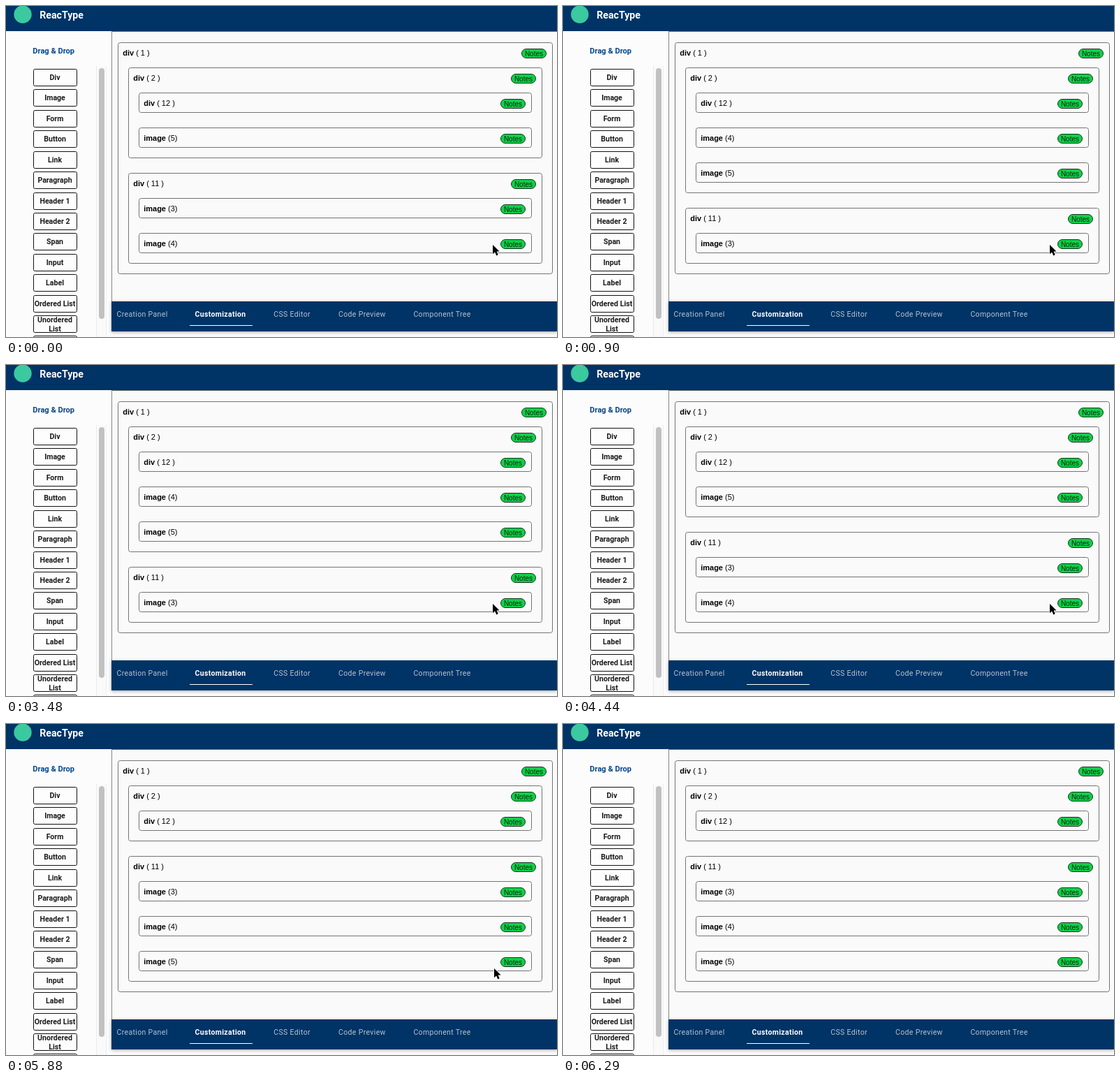
Write an HTML page that moves like this. It is 789 px wide and 474 px high and loops after 6530 ms.

```html
<!DOCTYPE html>
<html lang="en">
<head>
<meta charset="utf-8">
<title>Component nesting</title>
<style>
html, body { margin: 0; width: 100%; height: 100%; overflow: hidden; background: #fafafa; }
svg { display: block; width: 789px; height: 474px; }
text { white-space: pre; }
.ui { font-family: Roboto, sans-serif; }
.brand { font-size: 14.2px; font-weight: 700; fill: #fff; }
.head { font-size: 11.1px; font-weight: 700; fill: #08478a; text-anchor: middle; }
.item { font-size: 10.6px; font-weight: 700; fill: #1c1c1c; text-anchor: middle; }
.tab { font-size: 10.5px; letter-spacing: .35px; fill: #b5c2d1; }
.tab.on { font-weight: 700; fill: #fff; }
.tag { font: 11px "Liberation Sans", Arial, sans-serif; fill: #000; }
.tag tspan { font-weight: 700; }
.note { font: 10px "Liberation Sans", Arial, sans-serif; fill: #06270f; }
.bar { filter: drop-shadow(0 1px 2px rgba(0, 0, 0, .35)); }
</style>
</head>
<body>
<svg id="stage" viewBox="0 0 789 474"></svg>
<script>
const LOOP = 6530;
const stage = document.getElementById('stage');

function add(parent, tag, attrs, text) {
  const el = document.createElementNS('http://www.w3.org/2000/svg', tag);
  for (const key in attrs) el.setAttribute(key, attrs[key]);
  if (text) el.textContent = text;
  parent.appendChild(el);
  return el;
}

function rect(parent, x, y, width, height, fill, more) {
  return add(parent, 'rect', { x, y, width, height, fill, ...more });
}

function label(x, y, cls, text) {
  return add(stage, 'text', { x, y, class: 'ui ' + cls }, text);
}

function drawShell() {
  rect(stage, 0, 0, 789, 474, '#fafafa');
  rect(stage, 0, 36, 151, 438, '#fcfcfc');
  rect(stage, 0, 0, 789, 36, '#003366');
  rect(stage, 151, 36, 638, 1, '#6c7466');
  rect(stage, 151, 36, 1, 388, '#85877c');
  add(stage, 'circle', { cx: 24, cy: 12, r: 12.7, fill: '#3bc9a0' });
  label(48.2, 18, 'brand', 'ReacType');
  label(68.2, 68, 'head', 'Drag & Drop');

  const items = ['Div', 'Image', 'Form', 'Button', 'Link', 'Paragraph', 'Header 1',
    'Header 2', 'Span', 'Input', 'Label', 'Ordered List', 'Unordered|List', ''];
  items.forEach((name, i) => {
    const top = Math.round(90 + i * 29.42) + .5;
    rect(stage, 39.5, top, 62, 24, '#fdfdfd', { rx: 2, stroke: '#111' });
    const lines = name.split('|');
    lines.forEach((line, k) =>
      label(70, top + 15.7 + (k - (lines.length - 1) / 2) * 12.6, 'item', line));
  });

  rect(stage, 129, 86, 15, 388, '#fafafa');
  rect(stage, 129, 86, 1, 388, '#ececec');
  rect(stage, 143, 86, 1, 388, '#efefef');
  rect(stage, 133, 89, 8, 359, '#c1c1c1', { rx: 4 });
}

function drawTabs() {
  rect(stage, 151, 423, 638, 43, '#003366', { class: 'bar' });
  const tabs = [[158.5, 'Creation Panel'], [270.5, 'Customization'], [383.3, 'CSS Editor'],
    [476, 'Code Preview'], [583.4, 'Component Tree']];
  tabs.forEach(([x, name], i) => label(x, 445, i === 1 ? 'tab on' : 'tab', name));
  rect(stage, 263, 457, 90, 1, '#fff');
}

// Draws one nested box and returns its bottom edge.
function drawBox(parent, node, depth, top) {
  const [name, id, kids = []] = node;
  const left = 160.5 + depth * 15;
  const right = 782.5 - depth * 15;
  const frame = rect(parent, left, top, right - left, 28, 'none', { rx: 3, stroke: '#747474' });
  const tag = add(parent, 'text', { x: left + 6.7, y: top + 18.5, class: 'tag' });
  add(tag, 'tspan', {}, name);
  tag.append(' ' + id);
  rect(parent, right - 44, top + 9, 35, 13, '#10d048', { rx: 6.5, stroke: '#16351f' });
  add(parent, 'text', { x: right - 39.6, y: top + 19.2, class: 'note' }, 'Notes');

  let bottom = top + 28;
  kids.forEach((kid, i) => {
    bottom = drawBox(parent, kid, depth + 1, i ? bottom + 22 : top + 36);
  });
  if (kids.length) bottom += 15;
  frame.setAttribute('height', bottom - top);
  return bottom;
}

// Images numbered from `split` upward sit in the first group, the rest in the second.
function makeLayout(split) {
  const images = [3, 4, 5].map(n => ['image', `(${n})`]);
  const group = add(stage, 'g', {});
  drawBox(group, ['div', '( 1 )', [
    ['div', '( 2 )', [['div', '( 12 )'], ...images.slice(split - 3)]],
    ['div', '( 11 )', images.slice(0, split - 3)]
  ]], 0, 52.5);
  return group;
}

drawShell();
const layouts = [3, 4, 5, 6].map(makeLayout);
drawTabs();
const cursor = add(stage, 'path', {
  d: 'M0 0V13.2L3.1 10.4L5.3 15.4L7.7 14.3L5.6 9.5H9.6Z',
  fill: '#000', stroke: '#fff', 'stroke-width': 1.4, 'paint-order': 'stroke', 'stroke-linejoin': 'round'
});

// [start ms, layout index]
const layoutSteps = [[0, 2], [900, 1], [2100, 0], [3480, 1], [4440, 2], [5280, 3]];
// [start ms, x, y]; no position hides the pointer
const cursorSteps = [[0, 697, 342], [5880, 699, 350], [5940, 709, 385], [6000, 725, 437], [6050]];

const at = (steps, t) => steps.filter(s => s[0] <= t).pop();

function draw() {
  const t = performance.now() % LOOP;
  const shown = at(layoutSteps, t)[1];
  layouts.forEach((g, i) => g.setAttribute('visibility', i === shown ? 'visible' : 'hidden'));
  const [, x, y] = at(cursorSteps, t);
  cursor.setAttribute('visibility', x ? 'visible' : 'hidden');
  if (x) cursor.setAttribute('transform', `translate(${x} ${y})`);
  requestAnimationFrame(draw);
}
draw();
</script>
</body>
</html>
```
